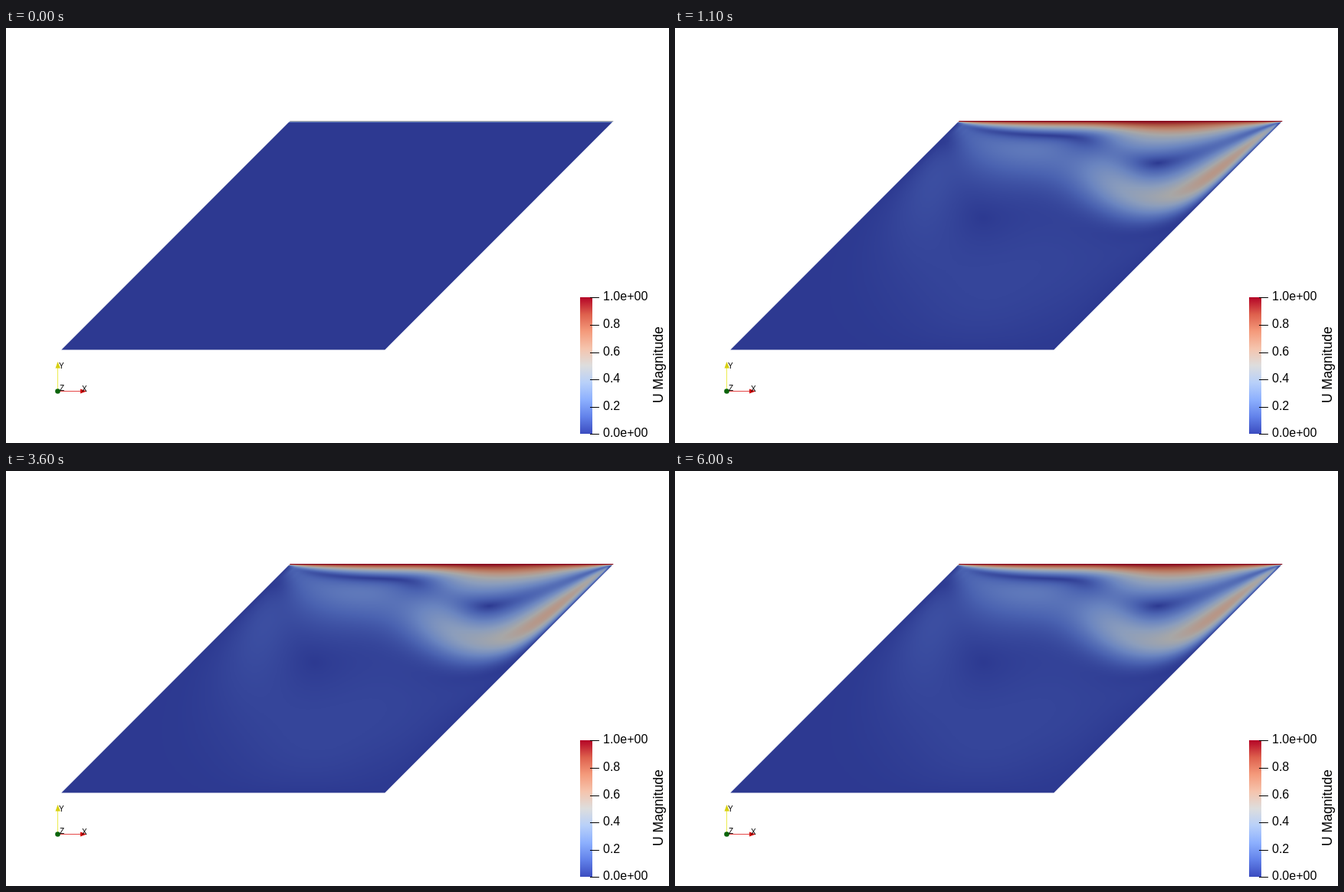
Write an HTML page with a canvas that moves like this. It is 865x541 px and loops after 6.1 s.

```html
<!DOCTYPE html>
<html lang="en">
<head>
<meta charset="utf-8">
<title>Skewed lid-driven cavity</title>
<style>
  html, body { margin: 0; width: 100%; height: 100%; overflow: hidden; background: #fff; }
  canvas, svg { position: absolute; left: 0; top: 0; }
  canvas { clip-path: polygon(370.8px 121px, 792.8px 121px, 494.3px 419.5px, 72.3px 419.5px); }
  text { font-family: "Liberation Sans", Arial, sans-serif; }
</style>
</head>
<body>
<canvas id="stage" width="865" height="541"></canvas>
<svg width="865" height="541">
  <defs><linearGradient id="ramp" x1="0" y1="1" x2="0" y2="0"></linearGradient></defs>
  <rect x="749" y="351" width="16" height="178" fill="url(#ramp)"/>
  <g id="ticks" font-size="16"></g>
  <text transform="translate(856.5 489) rotate(-90)" font-size="17.6">U Magnitude</text>
  <path d="M67.5 443V471" stroke="#ecec50"/>
  <path d="M67.5 435L71 443.5H64.5Z" fill="#d8d010"/>
  <path d="M70 473.5H98" stroke="#e64848"/>
  <path d="M97 470.5L105.5 473.5L97 476.5Z" fill="#d01010"/>
  <circle cx="67.5" cy="473.5" r="3.3" fill="#0a640a"/>
  <g font-size="10"><text x="69" y="443.5">Y</text><text x="99" y="474">X</text><text x="70" y="473">Z</text></g>
</svg>
<script>
// Vorticity-streamfunction flow at Re = 1000 in a 45-degree cavity, on a stretched oblique grid.
const N = 56, W = N + 1, h = 1 / N, nu = 0.001, c = Math.SQRT1_2, s = Math.SQRT1_2;
const dt = 0.005, stepsPerFrame = 400, sweeps = 3, relax = 1.8;
const frameMs = 100, frameCount = 61, steadyFrame = 40;

function makeAxis(b) {
  const map = t => t + b * Math.sin(Math.PI * t) / Math.PI;
  const slope = t => 1 + b * Math.cos(Math.PI * t);
  const invert = p => {
    let t = p;
    for (let n = 0; n < 30; n++) t = Math.min(1, Math.max(0, t - (map(t) - p) / slope(t)));
    return t;
  };
  return {
    invert,
    slope: Float64Array.from({ length: W }, (_, i) => slope(i * h)),
    link: Float64Array.from({ length: N }, (_, i) => 1 / slope((i + 0.5) * h)),
    first: map(h),
    last: 1 - map(1 - h)
  };
}

const axisX = makeAxis(0.4), axisY = makeAxis(0.6);
const ax = axisX.slope, gx = axisX.link, ay = axisY.slope, gy = axisY.link;
const field = () => new Float64Array(W * W);
const psi = field(), omega = field(), half = field(), mass = field(), diag = field();
const velU = field(), velV = field();

function eachInner(visit) {
  for (let j = 1; j < N; j++)
    for (let i = 1, k = j * W + 1; i < N; i++, k++) visit(k, i, j);
}

eachInner((k, i, j) => {
  mass[k] = s * s * ax[i] * ay[j] * h * h;
  diag[k] = ay[j] * (gx[i] + gx[i - 1]) + ax[i] * (gy[j] + gy[j - 1]);
});

function neighbours(f, k, i, j) {
  return ay[j] * (gx[i] * f[k + 1] + gx[i - 1] * f[k - 1])
    + ax[i] * (gy[j] * f[k + W] + gy[j - 1] * f[k - W])
    - c / 2 * (f[k + W + 1] - f[k + W - 1] - f[k - W + 1] + f[k - W - 1]);
}

function rate(f, k, i, j) {
  const advection = (psi[k + W] - psi[k - W]) * (f[k + 1] - f[k - 1])
    - (psi[k + 1] - psi[k - 1]) * (f[k + W] - f[k - W]);
  return (nu * (neighbours(f, k, i, j) - diag[k] * f[k]) - s / 4 * advection) / mass[k];
}

function setWalls() {
  const wall = (inner, d, speed) => -2 * (inner + d * s * speed) / (d * d * s * s);
  for (let j = 1; j < N; j++) {
    omega[j * W] = wall(psi[j * W + 1], axisX.first, 0);
    omega[j * W + N] = wall(psi[j * W + N - 1], axisX.last, 0);
  }
  for (let i = 0; i <= N; i++) {
    omega[i] = wall(psi[W + i], axisY.first, 0);
    omega[N * W + i] = wall(psi[(N - 1) * W + i], axisY.last, 1);
  }
}

function step() {
  setWalls();
  half.set(omega);
  for (let j = 1; j < N; j++)
    for (let i = 1, k = j * W + 1; i < N; i++, k++) half[k] = omega[k] + dt / 2 * rate(omega, k, i, j);
  for (let j = 1; j < N; j++)
    for (let i = 1, k = j * W + 1; i < N; i++, k++) omega[k] += dt * rate(half, k, i, j);
  for (let n = 0; n < sweeps; n++)
    for (let j = 1; j < N; j++)
      for (let i = 1, k = j * W + 1; i < N; i++, k++)
        psi[k] += relax * ((neighbours(psi, k, i, j) + omega[k] * mass[k]) / diag[k] - psi[k]);
}

// Diverging colour scale, dimmed on the lit surface
const stops = [[59, 76, 192], [98, 130, 234], [141, 176, 254], [184, 208, 249], [221, 221, 221],
  [245, 196, 173], [244, 154, 123], [222, 96, 77], [180, 4, 38]];
const shades = Uint32Array.from({ length: 1024 }, (_, n) => {
  const p = n / 1023 * 8, q = Math.min(7, Math.floor(p));
  const [r, g, b] = stops[q].map((v, m) => Math.round(0.755 * (v + (stops[q + 1][m] - v) * (p - q))));
  return (255 << 24 | b << 16 | g << 8 | r) >>> 0;
});

// One spare pixel on either side of each row lets the clip path smooth the slanted edges.
const ctx = document.getElementById('stage').getContext('2d');
const width = 422, height = 298, left = 72, top0 = 121, pad = 1;
const lookup = (axis, count) => Float64Array.from({ length: count + 1 + 2 * pad }, (_, n) =>
  axis.invert(Math.min(1, Math.max(0, (n - pad) / count))) * N);
const columns = lookup(axisX, width), rows = lookup(axisY, height);

function render(lidSpeed) {
  eachInner((k, i, j) => {
    const dx = (psi[k + 1] - psi[k - 1]) / (2 * h * ax[i]);
    const dy = (psi[k + W] - psi[k - W]) / (2 * h * ay[j]);
    velU[k] = (dy - c * dx) / s;
    velV[k] = -dx;
  });
  velU.fill(lidSpeed, N * W);
  const image = ctx.createImageData(height + columns.length, height + 1);
  const pixels = new Uint32Array(image.data.buffer);
  for (let y = 0; y <= height; y++) {
    const gridY = rows[height - y + pad], j = Math.min(N - 1, Math.floor(gridY)), fy = gridY - j;
    for (let x = 0; x < columns.length; x++) {
      const i = Math.min(N - 1, Math.floor(columns[x])), fx = columns[x] - i, k = j * W + i;
      const sample = f => (1 - fy) * (f[k] + fx * (f[k + 1] - f[k]))
        + fy * (f[k + W] + fx * (f[k + W + 1] - f[k + W]));
      const speed = Math.min(1, Math.hypot(sample(velU), sample(velV)));
      pixels[y * image.width + height - y + x] = shades[Math.round(speed * 1023)];
    }
  }
  return image;
}

const frames = [render(0.5)];
function frameAt(index) {
  while (frames.length <= index) {
    for (let n = 0; n < stepsPerFrame; n++) step();
    frames.push(render(1));
  }
  return frames[index];
}

document.getElementById('ramp').innerHTML = stops.map((rgb, n) =>
  `<stop offset="${n / 8}" stop-color="rgb(${rgb})"/>`).join('');
document.getElementById('ticks').innerHTML = ['0.0e+00', '0.2', '0.4', '0.6', '0.8', '1.0e+00'].map((label, n) => {
  const y = Math.ceil(529 - n * 35.6);
  return `<path d="M762 ${y + 0.5}H774" stroke="#000"/><text x="779" y="${y + 4}">${label}</text>`;
}).join('');

const start = performance.now();
let shown = -1;
function draw() {
  const index = Math.floor((performance.now() - start) / frameMs) % frameCount;
  const wanted = Math.max(0, Math.min(steadyFrame, index));
  if (wanted !== shown) {
    ctx.putImageData(frameAt(wanted), left - pad, top0);
    shown = wanted;
  }
  requestAnimationFrame(draw);
}
draw();
</script>
</body>
</html>
```
